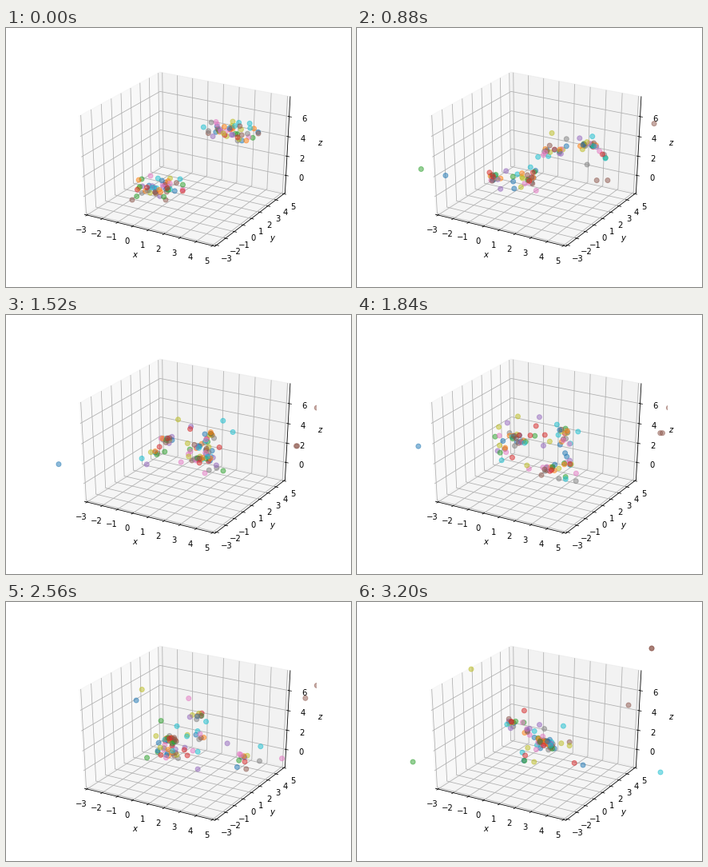
A matplotlib script for the animation above (3280 ms loop, 432x324 px).

```python
import numpy as np
import matplotlib.pyplot as plt
from matplotlib.animation import FuncAnimation

W, H, DPI = 432, 324, 72
FRAMES, STEP = 41, 80
BLUE, GREEN, BROWN, PINK, OLIVE, CYAN = 0, 2, 5, 6, 8, 9

rng = np.random.default_rng(7)
tracks, hues = [], []


def glide(keys):
    """Cubic Hermite path through evenly spaced keys, one position per frame."""
    slopes = np.gradient(keys, axis=0, edge_order=2)
    s = np.linspace(0, len(keys) - 1, FRAMES)
    k = np.minimum(s.astype(int), len(keys) - 2)
    u = (s - k)[:, None]
    return ((1 + 2 * u) * (1 - u) ** 2 * keys[k] + u * u * (3 - 2 * u) * keys[k + 1]
            + u * (1 - u) * ((1 - u) * slopes[k] - u * slopes[k + 1]))


def loner(hue, *way):
    tracks.append(glide(np.array(way, float)))
    hues.append(hue)


def flock(n, *way):
    """A loose cloud that contracts around a moving centre; some members stray."""
    way = np.array(way, float)
    spread = np.full(way.shape, (4.2, 2.8))
    for _ in range(n):
        reach = spread * (4.5 if rng.random() < 0.3 else 1)
        reach[0] = 14, 7
        jitter = np.clip(rng.normal(size=way.shape), -1.7, 1.7)
        loner(len(tracks) % 10, *(way + jitter * reach))


# lower cloud
flock(16, (175, 199), (160, 199), (202, 165), (198, 152), (206, 170), (195, 151))
flock(22, (200, 200), (207, 200), (239, 176), (240, 194), (206, 174), (234, 177))
flock(8, (211, 202), (218, 188), (192, 180), (186, 166), (208, 189), (240, 180))
# upper cloud
flock(12, (277, 129), (258, 142), (249, 172), (266, 188), (296, 195), (234, 175))
flock(12, (284, 130), (296, 144), (258, 152), (260, 145), (238, 142), (232, 175))
flock(14, (296, 129), (307, 136), (266, 166), (198, 160), (208, 189), (240, 180))
flock(8, (268, 130), (235, 143), (247, 175), (259, 157), (245, 167), (212, 161))
# wide swings around the middle
for x in (158, 200):
    loner(BROWN, (x, 215), (369, 160), (369, 58))
loner(BROWN, (316, 132), (390, 116), (340, 129))
loner(BLUE, (179, 203), (117, 185), (66, 184), (140, 118), (283, 204))
loner(GREEN, (170, 189), (42, 175), (70, 200))
loner(PINK, (181, 185), (255, 198), (425, 190))
loner(CYAN, (218, 189), (254, 158), (380, 213))
loner(OLIVE, (284, 117), (212, 130), (143, 84))

order = rng.permutation(len(tracks))
points = np.stack([tracks[i] for i in order], axis=1)

fig = plt.figure(figsize=(W / DPI, H / DPI), dpi=DPI)
box = (0.125, 0.11, 0.775, 0.77)
ax = fig.add_axes(box, projection="3d")
ax.apply_aspect = lambda position=None: None  # fill the whole box
ax.set_box_aspect((1, 1, 1), zoom=3 ** 0.5 / 1.8294640721620434)
ax.view_init(30, -60)
ax.set(xlim=(-3 - 1 / 6, 5 + 1 / 6), ylim=(-3 - 1 / 6, 5 + 1 / 6), zlim=(-1.85, 7.95),
       xticks=range(-3, 6), yticks=range(-3, 6), zticks=range(0, 7, 2),
       xlabel="$x$", ylabel="$y$", zlabel="$z$")

stage = fig.add_axes(box)
stage.set(xlim=(0.125 * W, 0.9 * W), ylim=(0.89 * H, 0.12 * H))
stage.axis("off")
cmap = plt.get_cmap("tab10")
dots = stage.scatter(*points[0].T, s=36, c=[cmap(hues[i]) for i in order],
                     alpha=0.5, linewidths=1)


def update(i):
    dots.set_offsets(points[i])
    return (dots,)


anim = FuncAnimation(fig, update, frames=FRAMES, interval=STEP, repeat=True)
plt.show()
```
